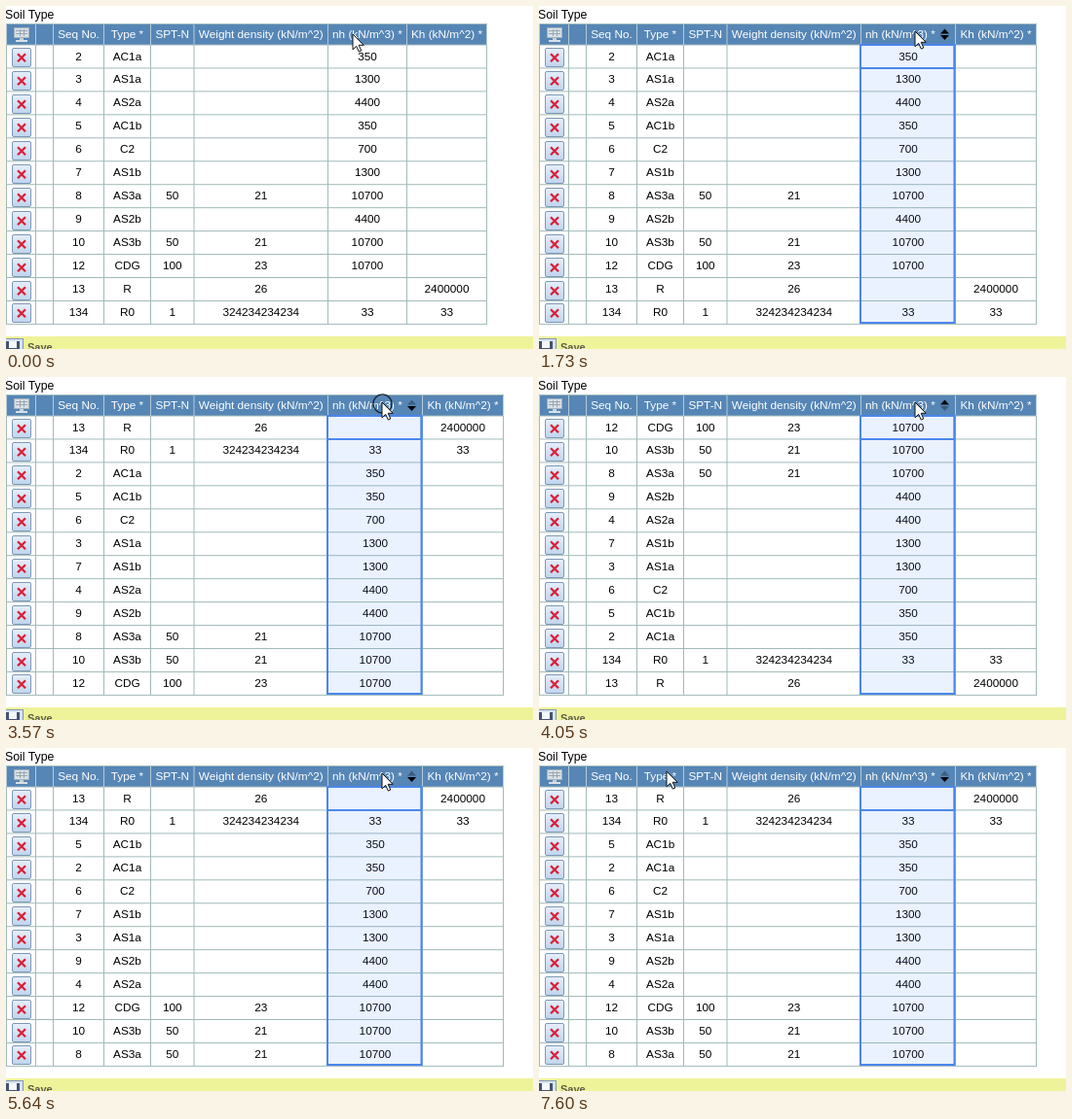
Animation of 541x353 px, one loop 8000 ms. Source, as an HTML page:

```html
<!DOCTYPE html>
<html lang="en">
<head>
<meta charset="utf-8">
<title>Soil Type</title>
<style>
  html, body { margin: 0; width: 100%; height: 100%; overflow: hidden; background: #fff; }
  svg { display: block; width: 541px; height: 353px; }
  text { font: 11.8px "Liberation Sans", Arial, sans-serif; fill: #000; }
  .title { font-size: 12.3px; }
  .save { font-size: 11px; font-weight: bold; fill: #5c5c48; }
  .head { fill: #fff; }
  .mid { text-anchor: middle; }
</style>
</head>
<body>
<svg viewBox="0 0 541 353">
  <defs>
    <linearGradient id="face" x1="0" y1="0" x2="0" y2="1">
      <stop offset="0" stop-color="#e6effa"/><stop offset="1" stop-color="#bfd5ee"/>
    </linearGradient>
    <g id="delete">
      <rect x="6.5" y=".5" width="19" height="19" rx="1.5" fill="url(#face)" stroke="#7d97b6"/>
      <path d="M12 6.2l8 8M20 6.2l-8 8" stroke="#d9203a" stroke-width="2.3"/>
    </g>
  </defs>
  <text x="-1" y="13" class="title">Soil Type</text>
  <g id="table"></g>
  <rect y="340" width="541" height="13" fill="#eef298"/>
  <rect x="-3.5" y="342.5" width="21" height="14" fill="#d6e2f0" stroke="#8299b4"/>
  <rect y="345" width="14" height="9" fill="#43536f"/>
  <rect x="3" y="345" width="8" height="7" fill="#f4f7fb"/>
  <text x="22" y="355" class="save">Save</text>
  <circle id="ring" cx="386.5" cy="27.5" r="9.6" fill="none" stroke="#17202c" stroke-width="1.3"/>
  <path id="arrow" d="M0 0v15.8l3.7-3.5 2.6 5.8 2.5-1.1-2.6-5.7h5z" fill="#fff" stroke="#111"/>
</svg>
<script>
const LOOP = 8000;
const $ = id => document.getElementById(id);

const soils = {
  AC1: { nh: 350 },
  AS1: { nh: 1300 },
  AS2: { nh: 4400 },
  AS3: { spt: 50, density: 21, nh: 10700 },
  C2: { nh: 700 },
  CDG: { spt: 100, density: 23, nh: 10700 },
  R: { density: 26, kh: 2400000 },
  R0: { seq: 134, spt: 1, density: 324234234234, nh: 33, kh: 33 }
};
const columns = {
  seq: 'Seq No.', type: 'Type *', spt: 'SPT-N',
  density: 'Weight density (kN/m^2)', nh: 'nh (kN/m^3) *', kh: 'Kh (kN/m^2) *'
};
const rows = 'AC1a AS1a AS2a AC1b C2 AS1b AS3a AS2b AS3b CDG R R0'.split(' ')
  .map((type, i) => ({ seq: i + (i < 9 ? 2 : 3), type, ...soils[type.replace(/[a-z]$/, '')] }));

const ascending = list => [...list].sort((a, b) => (a.nh || 0) - (b.nh || 0));
const up = ascending(rows);
const down = [...up].reverse();
const views = [
  { at: 0, rows, edge: 411, end: 494 },
  { at: 500, rows, sort: 'none' },
  { at: 2410, rows: up, sort: 'asc' },
  { at: 4050, rows: down, sort: 'desc' },
  { at: 5540, rows: ascending(down), sort: 'asc' }
];

// mouse down and up
const presses = [[2110, 2200], [2350, 2500], [3570, 3720], [3900, 4050], [5110, 5200], [5440, 5640]];

const home = { x: 356, y: 29 };
const glides = [
  { from: 1340, to: 1400, steps: 2, x: 357, y: 30 },
  { from: 1580, to: 1730, steps: 3, x: 386, y: 26 },
  { from: 6570, to: 7330, steps: 12, x: 148, y: 19 },
  { from: 7540, to: 7600, steps: 2, x: 131, y: 24 }
];

function pointer(t) {
  let { x, y } = home;
  for (const g of glides) {
    if (t < g.from) break;
    const step = Math.round((t - g.from) / (g.to - g.from) * (g.steps - 1)) + 1;
    const p = Math.min(1, step / g.steps) ** 1.15;
    x += (g.x - x) * p;
    y += (g.y - y) * p;
  }
  return `translate(${Math.round(x)} ${Math.round(y)})`;
}

const rowTop = i => 39.5 + 23.95 * i;
const rect = (x, y, w, h, fill, more = '') =>
  `<rect x="${x}" y="${y}" width="${w}" height="${h}" fill="${fill}" ${more}/>`;
const label = (x, y, s, cls) => `<text x="${x}" y="${y}" class="${cls}">${s}</text>`;

function sortIcon(sort) {
  const tri = (d, on) => `<path d="${d}" opacity="${on ? 1 : .3}"/>`;
  return tri('M412 28.5l4.5-5 4.5 5z', sort !== 'asc') +
         tri('M412 30l4.5 5 4.5-5z', sort !== 'desc');
}

function selection() {
  const box = h => rect(330, 40, 96.5, h, 'none', 'stroke="#4a87ee" stroke-width="2"');
  return rect(330, 40, 97, 287, '#4b89ff', 'opacity=".11"') + box(286) + box(24);
}

const menuIcon =
  rect(8.5, 22.5, 15, 10, '#d9e0e5', 'stroke="#a3b1bc"') +
  '<path d="M10 25.5h12M10 28.5h12M14.5 24v7M18.5 24v7" stroke="#98a7b1"/>' +
  rect(14, 33, 4, 2, '#c9d2d8') + rect(10, 35, 12, 2, '#d9e0e5');

function tableMarkup({ rows, sort, edge = 427, end = 511 }) {
  const xs = [48, 100, 148, 192.5, 330, edge, end - 1];
  const middle = c => (xs[c] + xs[c + 1]) / 2 + .5;
  const grid = '#a0bab9';
  let out = rect(0, 18, end, 22, '#5686b6') + menuIcon;

  for (let i = 0; i <= rows.length; i++) out += rect(0, rowTop(i), end, 1, grid);
  for (const x of [0, 30, ...xs]) out += rect(x, 18, 1, 22, '#b4cbd9') + rect(x, 40, 1, 287.5, grid);
  out += rect(0, 18, end, 1, grid);

  Object.entries(columns).forEach(([key, title], c) => {
    out += key === 'nh' ? label(335, 33, title, 'head') : label(middle(c), 33, title, 'head mid');
    rows.forEach((row, i) => {
      if (row[key]) out += label(middle(c), Math.round(rowTop(i) + 16), row[key], 'mid');
    });
  });
  rows.forEach((_, i) => { out += `<use href="#delete" y="${Math.round(rowTop(i) + 3.5)}"/>`; });

  return sort ? out + selection() + sortIcon(sort) : out;
}

let shown;
function draw(t) {
  const view = views.findLast(v => v.at <= t);
  if (view !== shown) {
    $('table').innerHTML = tableMarkup(view);
    shown = view;
  }
  $('arrow').setAttribute('transform', pointer(t));
  $('ring').style.display = presses.some(([a, b]) => t >= a && t < b) ? '' : 'none';
}

const start = performance.now();
function tick() {
  draw((performance.now() - start) % LOOP);
  requestAnimationFrame(tick);
}
tick();
</script>
</body>
</html>
```
